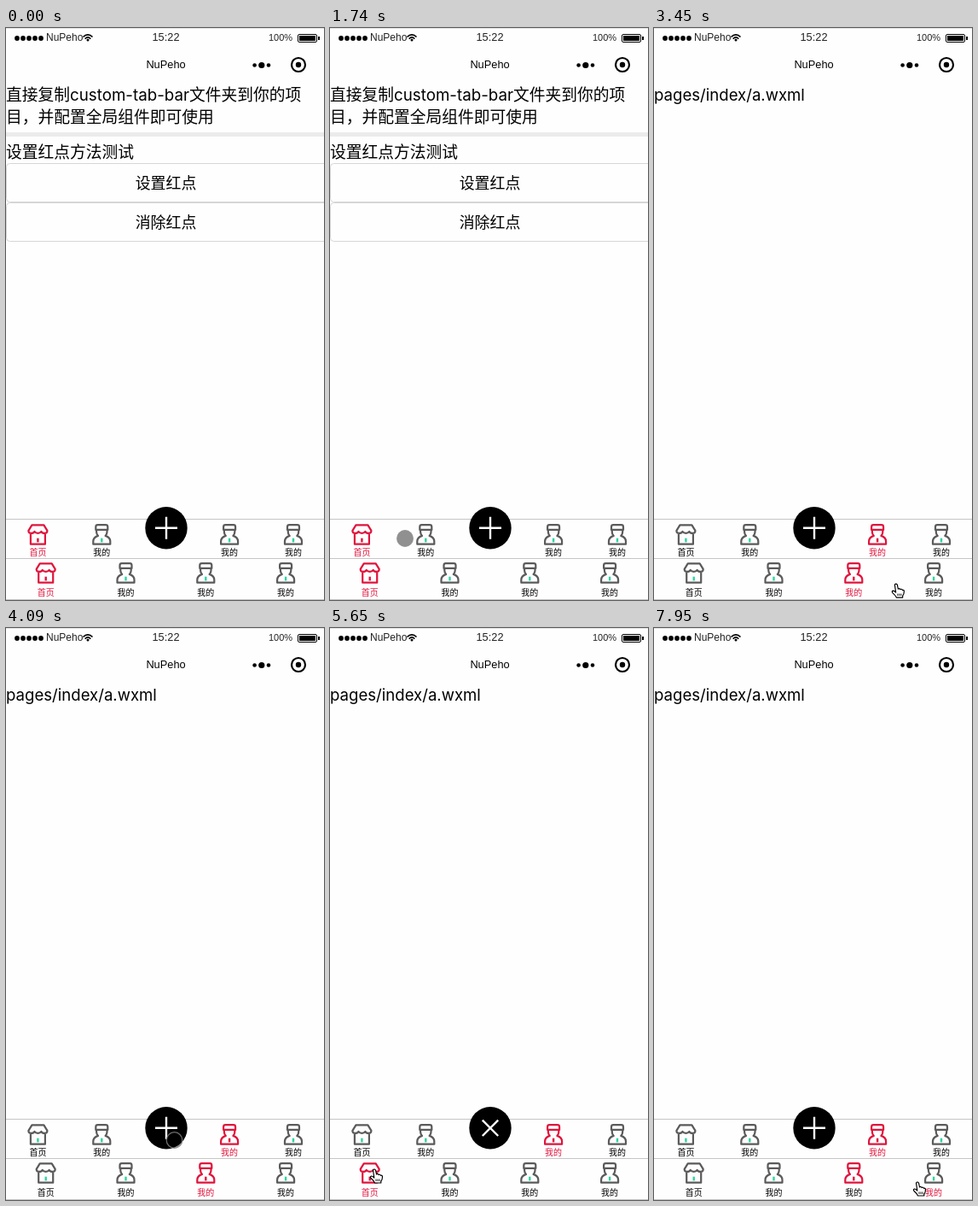
Animation, 373 px wide and 669 px high, one loop 8000 ms. Source, as an HTML page with a canvas:

```html
<!DOCTYPE html>
<html lang="zh">
<head>
<meta charset="utf-8">
<style>
html, body { margin: 0; width: 100%; height: 100%; overflow: hidden; background: #fefefe; }
canvas { display: block; width: 373px; height: 669px; }
</style>
</head>
<body>
<canvas id="stage"></canvas>
<script>
const W = 373, H = 669, LOOP = 8000;
const RED = '#e0143c', GRAY = '#5a5a5a', GREEN = '#2fd3a2', INK = '#000';
const CJK = '"Noto Sans CJK SC", "Noto Sans CJK", sans-serif';
const BODY = 'Inter, ' + CJK;
const UI = '"Liberation Sans", Arial, sans-serif';
const APP = 'NuPeho';

const canvas = document.getElementById('stage');
const dpr = window.devicePixelRatio || 1;
canvas.width = W * dpr;
canvas.height = H * dpr;
const ctx = canvas.getContext('2d');

const ease = p => p * p * (3 - 2 * p);
const progress = (t, start, span) => Math.max(0, Math.min(1, (t - start) / span));

// Each tap selects a tab: its label reacts first, then the icon, then the page.
const taps = [[0, 0], [2180, 1], [3280, 2], [5600, 0], [6890, 2], [7950, 3]];
const ICON_LAG = 50, PAGE_LAG = 60;
const tabAt = t => taps.filter(([at]) => at <= Math.max(0, t)).pop()[1];

// Pointer moves: start, span, end point and an optional sideways bend.
const entry = { x: 312, y: 664 };
const moves = [
  { at: 60, span: 280, x: 118, y: 576 },
  { at: 730, span: 120, x: 118, y: 550 },
  { at: 1210, span: 160, x: 81, y: 597 },
  { at: 1540, span: 310, x: 107, y: 597, bendX: -13 },
  { at: 2240, span: 730, x: 235, y: 648, bendX: 22, bendY: 25 },
  { at: 3000, span: 120, x: 243, y: 643 },
  { at: 3300, span: 790, x: 197.5, y: 599, bendX: 80, bendY: 20 },
  { at: 4120, span: 400, x: 174, y: 593, bendX: 136, bendY: 27 },
  { at: 4840, span: 640, x: 52, y: 633, bendX: -30, bendY: 25 },
  { at: 5720, span: 570, x: 184, y: 590 },
  { at: 6480, span: 250, x: 228, y: 648, bendX: 20, bendY: 8 },
  { at: 7360, span: 410, x: 309, y: 648 }
];

function pointerAt(t) {
  let { x, y } = entry;
  for (const m of moves) {
    const p = progress(t, m.at, m.span);
    const bow = Math.sin(Math.PI * p);
    x += (m.x - x) * ease(p) + (m.bendX || 0) * bow;
    y += (m.y - y) * ease(p) + (m.bendY || 0) * bow;
    if (p < 1) break;
  }
  return [x, y];
}

function text(str, x, y, size, family, color = INK, align = 'left') {
  ctx.font = `${size}px ${family}`;
  ctx.fillStyle = color;
  ctx.textAlign = align;
  ctx.fillText(str, x, y);
}

function dot(x, y, r, color = INK) {
  ctx.fillStyle = color;
  ctx.beginPath();
  ctx.arc(x, y, r, 0, 2 * Math.PI);
  ctx.fill();
}

function ring(x, y, r, width, color = INK) {
  ctx.strokeStyle = color;
  ctx.lineWidth = width;
  ctx.beginPath();
  ctx.arc(x, y, r, 0, 2 * Math.PI);
  ctx.stroke();
}

function rect(x, y, w, h, color) {
  ctx.fillStyle = color;
  ctx.fillRect(x, y, w, h);
}

function frameBox(x, y, w, h, r, color) {
  ctx.strokeStyle = color;
  ctx.lineWidth = 1;
  ctx.beginPath();
  ctx.roundRect(x + 0.5, y + 0.5, w, h, r);
  ctx.stroke();
}

function stroke(path, color, width) {
  ctx.strokeStyle = color;
  ctx.lineWidth = width;
  ctx.stroke(path);
}

function mirrored(d) {
  const half = new Path2D(d), whole = new Path2D(half);
  whole.addPath(half, new DOMMatrix([-1, 0, 0, 1, 0, 0]));
  return whole;
}

const wifi = mirrored('M0-4.2Q3 -4.2 5.5-1.5M0-1.1Q1.8-1.1 3.2.7');
const cross = new Path2D('M-13 0H13M0-13V13');
const shop = mirrored('M0-11H7L11-4.5Q11-1.5 8-1.5Q5-1.5 4-3.5Q2.5-1.5 0-1.5M8.5-1V11.3H0');
const person = mirrored('M0-11.3H4.7Q7-11.3 7-9V-5.5H0M6.2-5.5V-3Q6.2-.5 4.3 1.5Q10 3.5 10 8V11.3H0');
const hand = new Path2D('M-1.5 1Q0-1 1.5 1L2.5 6Q4 4.7 5 6.5Q6.5 5.5 7.5 7.3Q9.5 6.8 9.5 9Q9.5 12 7.8 14V16H.5Q-.5 13.5-4 10.5Q-5.3 8.5-3.5 8Q-2 8-.2 10Z');
const fingers = new Path2D('M2 11.5V14M4 11.5V14M6 11.5V14');

function statusBar() {
  rect(0, 0, W, 1, '#e2e2e2');
  for (let i = 0; i < 5; i++) dot(13 + i * 7, 12, 2.9);
  text(APP, 47, 15, 12, UI, '#222');
  ctx.save();
  ctx.translate(96, 12);
  stroke(wifi, INK, 1.7);
  ctx.restore();
  dot(96, 14.1, 1.5);
  text('15:22', 187.5, 15.2, 12.8, UI, '#222', 'center');
  text('100%', 308, 15, 11, UI, '#222');
  frameBox(342, 7, 22, 9, 1.5, INK);
  rect(344, 9, 19, 6, INK);
  rect(366, 10, 2, 4, INK);
}

function navBar() {
  text(APP, 187.5, 47, 12.8, UI, INK, 'center');
  for (const i of [-1, 0, 1]) dot(299.8 + i * 8.2, 43.5, i ? 2.3 : 3.6);
  dot(343, 43, 3.2);
  ring(343, 43, 8, 2.2);
}

function button(label, y) {
  frameBox(0, y, W + 8, 45, 4, '#d6d6d6');
  text(label, 187.5, y + 29.5, 17.9, BODY, INK, 'center');
}

function pageBody(page) {
  if (page) {
    text(page === 1 ? 'index/mine.wxml' : 'pages/index/a.wxml', 0, 85, 18.6, BODY);
    return;
  }
  text('直接复制custom-tab-bar文件夹到你的项', 0, 85.2, 18.75, BODY);
  text('目，并配置全局组件即可使用', 0, 111.2, 18.75, BODY);
  rect(0, 122, W, 5, '#ebebeb');
  text('设置红点方法测试', 0, 151.8, 18.75, BODY);
  button('设置红点', 158);
  button('消除红点', 204);
}

function tab(x, y, labelY, isHome, iconOn, labelOn) {
  ctx.save();
  ctx.translate(x, y);
  ctx.lineJoin = ctx.lineCap = 'round';
  stroke(isHome ? shop : person, iconOn ? RED : GRAY, 2.2);
  rect(-1.2, 4.3, 2.4, 4.7, iconOn ? RED : GREEN);
  ctx.restore();
  text(isHome ? '首页' : '我的', x, labelY, 10, CJK, labelOn ? RED : INK, 'center');
}

function plus(t) {
  const turn = ease(progress(t, 4660, 240)) - ease(progress(t, 6440, 220));
  ctx.save();
  ctx.translate(188, 584.8);
  dot(0, 0, 24.7);
  ctx.rotate(turn * Math.PI / 4);
  stroke(cross, '#fff', 2.4);
  ctx.restore();
}

function tabBars(t, page) {
  const icon = tabAt(t - ICON_LAG), label = tabAt(t);
  for (const y of [574, 620, 668]) rect(0, y, W, 1, '#c6c6c6');

  // The upper bar keeps its middle slot for the round button.
  const active = page === 2 ? 3 : page;
  for (let i = 0; i < 5; i++) {
    if (i === 2) plus(t);
    else tab(37.4 + i * 74.9, 592.4, 616.8, i === 0, i === active, i === active);
  }
  for (let i = 0; i < 4; i++) {
    tab(46.7 + i * 93.8, 637.4, 663.8, i === 0, i === icon, i === label);
  }
}

function pointer(t) {
  if (t < moves[0].at) return;
  const [x, y] = pointerAt(t);
  ctx.save();
  ctx.translate(x, y);
  if (y > 621) {
    ctx.fillStyle = '#fff';
    ctx.lineJoin = 'round';
    ctx.fill(hand);
    stroke(hand, INK, 1.2);
    stroke(fingers, INK, 0.9);
  } else {
    dot(0, 0, 9.7, 'rgba(0,0,0,.43)');
    ring(0, 0, 9.3, 1.3, 'rgba(145,145,145,.75)');
  }
  ctx.restore();
}

function draw(t) {
  const page = tabAt(t - PAGE_LAG);
  ctx.setTransform(dpr, 0, 0, dpr, 0, 0);
  rect(0, 0, W, H, '#fefefe');
  statusBar();
  navBar();
  pageBody(page);
  tabBars(t, page);
  pointer(t);
}

const start = performance.now();
function frame() {
  draw((performance.now() - start) % LOOP);
  requestAnimationFrame(frame);
}
frame();
</script>
</body>
</html>
```
